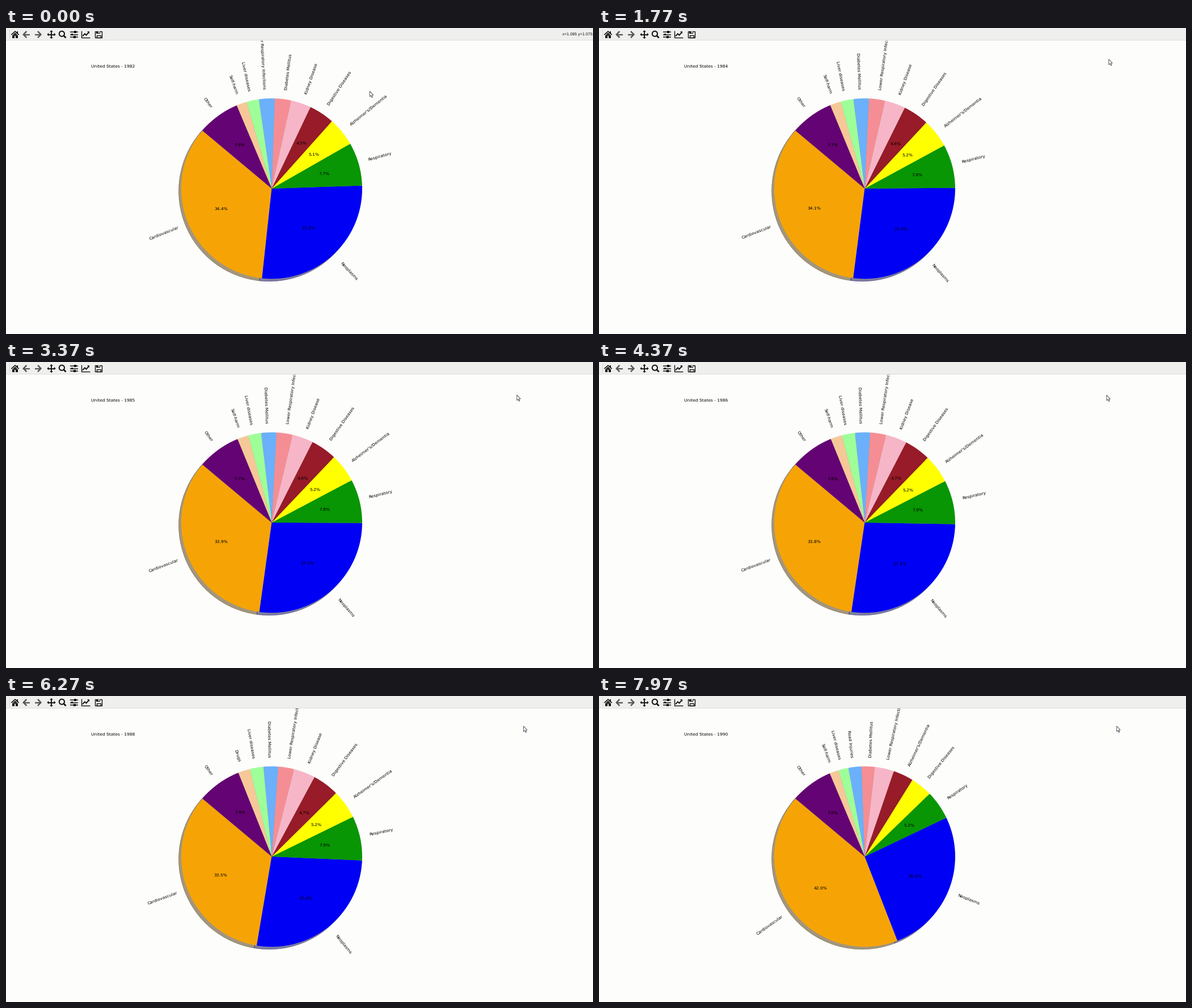
Recreate the animation shown at these times as a matplotlib script. Size 1035 px wide and 541 px high, loop 8000 ms.

```python
import numpy as np
import matplotlib.pyplot as plt
from matplotlib.animation import FuncAnimation
from matplotlib.patches import Circle, Polygon, Rectangle

W, H, DPI = 1035, 541, 100
CX, CY, R = 468.5, 283.9, 159.5      # pie centre and radius in pixels
PX = 72 / DPI                        # points per pixel
INTERVAL, FRAMES = 40, 200
FIRST_YEAR, FIRST_CHANGE, YEAR_MS = 1982, 400, 1000
FONT = 7.47 * PX
INK, GREY, BAR = "#101010", "#565656", "#efefee"

plt.rcParams["font.family"] = "DejaVu Sans"
plt.rcParams["text.hinting"] = "none"
plt.rcParams["toolbar"] = "None"

COLORS = ["#f6a405", "#0000f4", "#089604", "#ffff00", "#971b28", "#f6b6c8",
          "#f58e94", "#6bb0fa", "#9eff98", "#f6c898", "#640373"]

# Percent shares in the key years, counter-clockwise from 140 degrees
KEYS = {
    1982: np.array([34.4, 27.24, 7.745, 5.145, 4.54, 3.6, 2.9, 2.82, 2.2, 1.85, 7.56]),
    1988: np.array([33.46, 26.97, 7.945, 5.165, 4.74, 3.85, 2.83, 2.62, 2.42, 2.13, 7.87]),
    1989: np.array([42.5, 25.98, 5.13, 3.86, 3.6, 3.4, 2.33, 2.31, 1.78, 1.61, 7.5]),
}


def shares(year):
    if year <= 1988:
        u = (year - 1982) / 6
        return KEYS[1982] * (1 - u) + KEYS[1988] * u
    # the largest share falls, all others grow in proportion
    first = KEYS[1989][0] - 0.5 * (year - 1989)
    rest = KEYS[1989][1:]
    return np.append(first, rest * (100 - first) / rest.sum())


def causes(year):
    lower, diabetes, road = "Lower Respiratory Infections", "Diabetes Mellitus", "Road Injuries"
    mid = ["Alzheimer's/Dementia", "Digestive Diseases"]
    if year < 1989:
        mid += ["Kidney Disease"]
        mid += [diabetes, lower] if year == 1982 else [lower, diabetes]
    else:
        mid = mid[::-1] + [lower]
        mid += [road, diabetes] if year == 1989 else [diabetes, road]
    last = "Drugs" if year == 1988 else "Self-harm"
    return ["Cardiovascular", "Neoplasms", "Respiratory", *mid, "Liver diseases", last, "Other"]


fig = plt.figure(figsize=(W / DPI, H / DPI), dpi=DPI, facecolor="#fdfdfb")


def pie_axes(year):
    ax = fig.add_axes([0, 0, 1, 1], zorder=1)
    ax.pie(shares(year), labels=causes(year), colors=COLORS, startangle=140,
           shadow=True, rotatelabels=True,
           autopct=lambda p: f"{p:.1f}%" if p > 4.2 else "",
           wedgeprops={"linewidth": 0.54}, textprops={"size": FONT})
    ax.text(-2, 1.343, f"United States - {year}", size=FONT)
    ax.set_xlim(-CX / R, (W - CX) / R)
    ax.set_ylim((CY - H) / R, CY / R)
    ax.set_axis_off()
    return ax


pies = {year: pie_axes(year) for year in range(FIRST_YEAR, 1991)}

top = fig.add_axes([0, 0, 1, 1], zorder=5)
top.set_xlim(0, W)
top.set_ylim(H, 0)
top.set_axis_off()


def rect(x, y, w, h, color=INK):
    top.add_patch(Rectangle((x, y), w, h, fc=color, lw=0))


def frame(x, y, w, h):
    top.add_patch(Rectangle((x, y), w, h, fill=False, ec=INK, lw=1.4 * PX))


def poly(points, color=INK):
    top.add_patch(Polygon(points, fc=color, lw=0))


def line(points, width, color=INK):
    x, y = zip(*points)
    top.plot(x, y, color=color, lw=width * PX,
             solid_capstyle="butt", solid_joinstyle="miter")


MID = 11.5       # centre line of the toolbar


def home(x):
    line([(x - 6.7, 12), (x, 6), (x + 6.7, 12)], 1.6)
    rect(x + 3.4, 6, 1.7, 4)
    poly([(x - 4.7, 12.6), (x, 8.5), (x + 4.7, 12.6)])
    for side in (-4.7, 1.3):
        rect(x + side, 12.5, 3.4, 5.1)
    rect(x - 2, 12.5, 4, 1.3)


def arrow(x, way):
    line([(x - way * 5.8, MID), (x + way * 5.5, MID)], 2.3, GREY)
    line([(x, MID + s * 5.7) if s else (x - way * 5.4, MID) for s in (-1, 0, 1)], 2.5, GREY)


def pan(x):
    line([(x - 6, MID), (x + 6, MID)], 1.9)
    line([(x, MID - 6), (x, MID + 6)], 1.9)
    for a in np.arange(4) * np.pi / 2:
        d, n = np.array([np.cos(a), np.sin(a)]), np.array([-np.sin(a), np.cos(a)])
        poly([(x, MID) + 7.6 * d, (x, MID) + 4.7 * d + 2.9 * n, (x, MID) + 4.7 * d - 2.9 * n])


def zoom(x):
    top.add_patch(Circle((x - 1, 10.2), 4.6, fill=False, ec=INK, lw=2 * PX))
    line([(x + 2.2, 13.4), (x + 6.2, 17.4)], 2.7)


def sliders(x):
    for row, knob in zip((-1, 0, 1), (2, -3.5, 1)):
        y = MID + 4.5 * row
        line([(x - 7, y), (x + 7, y)], 1.5)
        rect(x + knob - 1.6, y - 1.9, 3.2, 3.8)


def chart(x):
    line([(x - 7.1, 5), (x - 7.1, 17.3), (x + 8, 17.3)], 1.4)
    line([(x - 5, 14.4), (x - 1, 10.2), (x + 1.5, 12.6), (x + 6, 7.6)], 1.9)
    poly([(x + 3.4, 6), (x + 7.4, 6), (x + 7.4, 10)])


def save(x):
    frame(x - 6, 5.6, 12, 11.8)
    rect(x - 4, 5.6, 6.6, 4.3)
    rect(x, 6.4, 1.6, 2.6, BAR)
    frame(x - 3.2, 12.9, 6.6, 4.5)


rect(0, 0, W, 21, BAR)
rect(0, 21, W, 1, "#dcdcda")
rect(5.5, 3, 1, 16, "#d8d8d6")
home(16)
arrow(36.3, 1)
arrow(56, -1)
for icon, x in zip((pan, zoom, sliders, chart, save), (80, 99.4, 120, 140, 163.3)):
    icon(x)

coords = top.text(1034.4, 13.6, "", family="Liberation Sans", size=7.1 * PX,
                  ha="right", color=INK)

POINTER = np.array([(0, 0), (0, 9.6), (2.2, 7.7), (3.7, 11.1), (5.2, 10.4),
                    (3.7, 7.2), (6.4, 6.8)]) - (0.2, 0.8)
cursor = Polygon(POINTER, fc="#fbfbfb", ec="#35353f", lw=0.8 * PX)
top.add_patch(cursor)

# Pointer moves: start ms, end ms, end point
START = np.array([641.5, 112.5])
MOVES = [(760, 1400, (899, 56)), (2000, 2600, (901, 59)),
         (3450, 3800, (895.3, 59.3)), (5500, 6300, (913, 54))]


def pointer(t):
    pos = START
    for begin, end, goal in MOVES:
        u = np.clip((t - begin) / (end - begin), 0, 1)
        pos = pos + (np.array(goal) - pos) * u * u * (3 - 2 * u)
    return pos


def update(i):
    t = i * INTERVAL
    year = FIRST_YEAR + (t - FIRST_CHANGE) // YEAR_MS + 1
    for y, ax in pies.items():
        ax.set_visible(y == year)
    tip = pointer(t)
    cursor.set_xy(POINTER + tip)
    x, y = (tip[0] - CX) / R, (CY - tip[1]) / R
    inside = max(abs(x), abs(y)) < 1.25
    coords.set_text(f"x={x:.3f} y={y:.3f}" if inside else "")
    return []


anim = FuncAnimation(fig, update, frames=FRAMES, interval=INTERVAL,
                     init_func=lambda: update(0), repeat=True, repeat_delay=0, blit=False)
plt.show()
```
